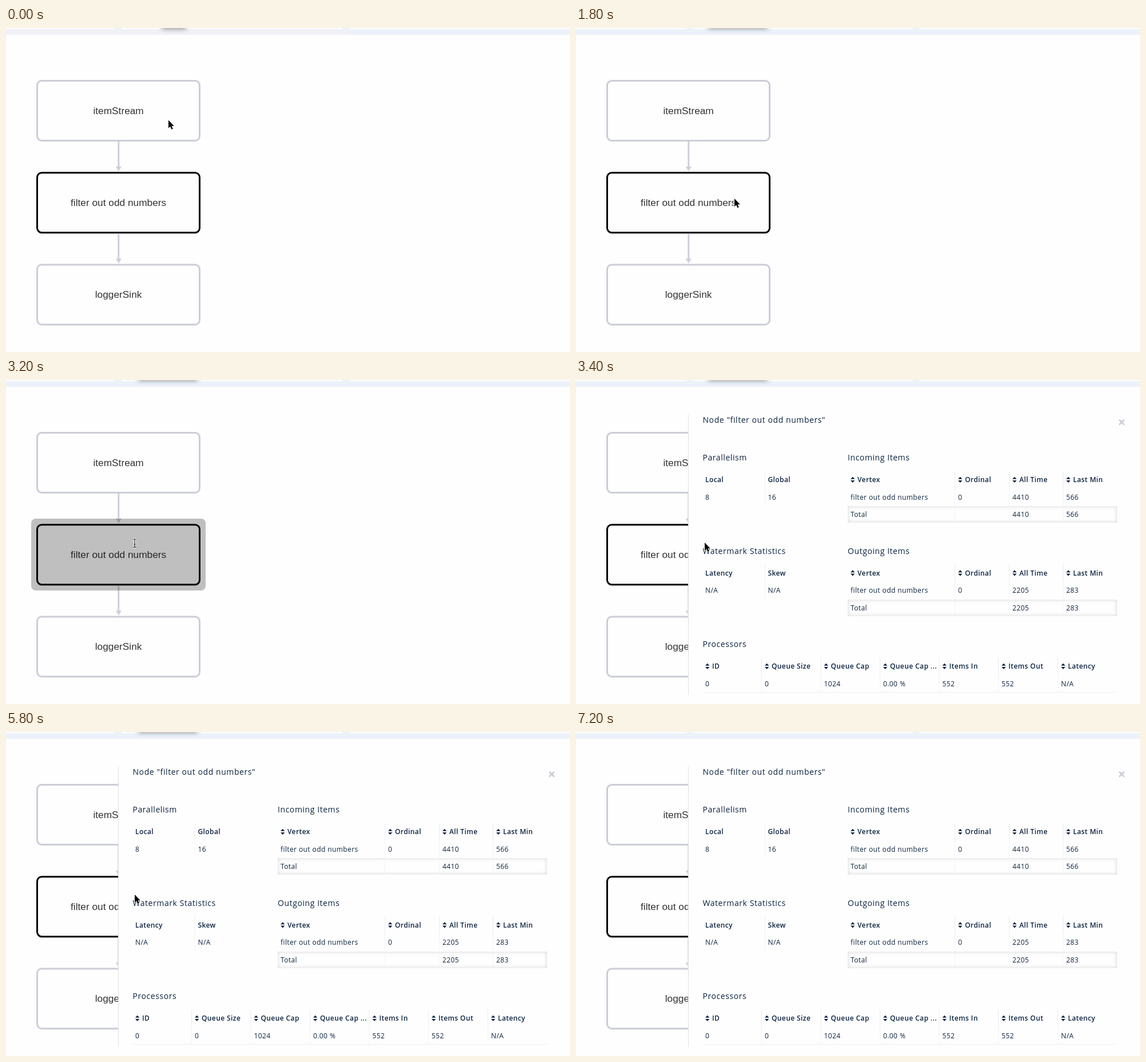
Recreate the animation shown at these times as an HTML page. Size 986 px wide and 568 px high, loop 7.4 s.

```html
<!DOCTYPE html>
<html lang="en">
<head>
<meta charset="utf-8">
<title>Pipeline node details</title>
<style>
  html, body { margin: 0; width: 100%; height: 100%; overflow: hidden; background: #fefefe; }
  #stage { position: relative; width: 986px; height: 568px; overflow: hidden; }
  svg { position: absolute; left: 0; top: 0; }
  #panel { position: absolute; left: 0; top: 0; }
  .backdrop { position: absolute; left: 196px; top: 61px; width: 790px; height: 491px; box-sizing: border-box;
    background: #fefefe; border-left: 1px solid #dfe1e6; }
  .total { position: absolute; left: 475px; width: 471px; height: 29px; box-shadow: inset 0 0 7px rgba(0, 0, 0, .17); }
  .tip { position: absolute; top: -22px; height: 20px; }
  #tipA { left: 275px; width: 38px; box-shadow: 0 1px 9px 2px rgba(0, 0, 0, .5); }
  #tipB { left: 233px; width: 100px; box-shadow: 0 1px 9px 2px rgba(0, 0, 0, .42); }
  .node { font: 17.3px "Liberation Sans", Arial, sans-serif; text-anchor: middle; fill: #333; }
  .title, .cell, .head { font-family: "Open Sans", sans-serif; fill: #0c2340; }
  .title { font-size: 14px; letter-spacing: .57px; }
  .cell { font-size: 12px; letter-spacing: .4px; }
  .head { font-size: 12px; letter-spacing: .4px; font-weight: 600; }
</style>
</head>
<body>
<div id="stage">
  <svg id="graph" width="986" height="568"></svg>
  <div class="tip" id="tipA"></div>
  <div class="tip" id="tipB"></div>
  <div id="panel">
    <div class="backdrop"></div>
    <div class="total" style="top:221px"></div>
    <div class="total" style="top:384.5px"></div>
    <svg id="details" width="986" height="568"></svg>
  </div>
  <svg width="986" height="568">
    <g id="arrow" stroke-linejoin="round">
      <path d="M0 0V14L3.2 11.2 5.4 16.3 7.7 15.3 5.6 10.3H9.8Z" stroke="#fff" stroke-width="1.6" paint-order="stroke"/>
    </g>
    <g id="beam" transform="translate(225 286)" fill="none">
      <path id="beamLine" d="M-3-7.5Q0-7.5 0-5.5Q0-7.5 3-7.5M0-6V6M-3 7.5Q0 7.5 0 5.5Q0 7.5 3 7.5M-1.5 2H1.5" stroke="#fff" stroke-width="3"/>
      <use href="#beamLine" style="stroke:#222"/>
      <path d="M-3-7.5Q0-7.5 0-5.5Q0-7.5 3-7.5M0-6V6M-3 7.5Q0 7.5 0 5.5Q0 7.5 3 7.5M-1.5 2H1.5" stroke="#222" stroke-width="1.2"/>
    </g>
  </svg>
</div>
<script>
const $ = id => document.getElementById(id);
const text = (kind, x, y, s) => `<text class="${kind}" x="${x}" y="${y}">${s}</text>`;
const rect = (x, y, w, h, fill, extra = '') =>
  `<rect x="${x}" y="${y}" width="${w}" height="${h}" fill="${fill}" ${extra}/>`;

function buildGraph() {
  let out = rect(0, 0, 986, 12, '#ecf2fa') + rect(0, 2, 600, 10, '#f1f1f8', 'id="strip"');
  for (const [x, w] of [[0, 190], [203, 385], [600, 386]]) out += rect(x, 0, w, 2, '#fefefe');
  ['itemStream', 'filter out odd numbers', 'loggerSink'].forEach((label, i) => {
    const y = 92.5 + 161.2 * i;
    out += rect(54.5, y, 284, 105, '#fefefe', `rx="8" stroke="${i === 1 ? '#000' : '#cbced8'}" stroke-width="3"`);
    out += text('node', 196.6, y + 58, label);
    if (i < 2) out += `<path d="M195.3 ${y + 106.5}h3v44h3.6l-5 8.5l-5-8.5h3.4z" fill="#cdd0d9"/>`;
  });
  return out + rect(44, 243, 305, 126, '#000', 'id="highlight" rx="8" fill-opacity=".25"');
}

// Column positions are the left edges of the cell text.
function table(title, x, top, columns, heads, rows, sortable) {
  let out = text('title', x, top + 141.3, title);
  const height = sortable && rows.length > 1 ? 90 : 60;
  columns.forEach((cx, i) => {
    if (i) {
      out += rect(cx - 6, top + 160, 1, 30, '#e9ebef');
      out += rect(cx - 6, top + 190, 1, height - 30, '#f3f4f6');
    }
    if (sortable) {
      const y = top + 174.7;
      out += `<path d="M${cx} ${y - 1}l3.7-4 3.7 4zM${cx} ${y + 1.3}l3.7 4 3.7-4z" fill="#0c2340"/>`;
    }
    out += text('head', cx + (sortable ? 12 : 0), top + 179, heads[i]);
    rows.forEach((row, r) => out += text('cell', cx, top + 209.7 + 30.5 * r, row[i]));
  });
  return out;
}

function buildDetails() {
  const name = 'filter out odd numbers';
  const flow = (title, top, all, last) => table(title, 475, top, [480, 668, 763, 857],
    ['Vertex', 'Ordinal', 'All Time', 'Last Min'], [[name, 0, all, last], ['Total', '', all, last]], true);
  return text('title', 221.5, 74.7, `Node "${name}"`)
    + '<path d="M949.5 69.5l9 9m0-9l-9 9" stroke="#c8ccd3" stroke-width="2.5"/>'
    + table('Parallelism', 221.5, 0, [226, 335.5], ['Local', 'Global'], [[8, 16]])
    + table('Watermark Statistics', 221.5, 163.5, [226, 335.5], ['Latency', 'Skew'], [['N/A', 'N/A']])
    + flow('Incoming Items', 0, 4410, 566)
    + flow('Outgoing Items', 163.5, 2205, 283)
    + table('Processors', 221.5, 327, [226, 330, 433.5, 537, 640.5, 744, 848],
        ['ID', 'Queue Size', 'Queue Cap', 'Queue Cap ...', 'Items In', 'Items Out', 'Latency'],
        [[0, 0, 1024, '0.00 %', 552, 552, 'N/A']], true)
    + rect(222, 547, 724, 1, '#eceef1');
}

const LOOP = 7400, STEP = 200;
const ramp = (t, a, b) => Math.min(1, Math.max(0, (t - a) / (b - a)));
const ease = p => p * p * (3 - 2 * p);
// [start, end, x, y] of each pointer move
const moves = [[0, 1000, 277, 299], [2600, 3000, 225, 285], [6200, 7000, 262, -25]];

function pointer(t) {
  let x = 284, y = 161.5;
  for (const [a, b, tx, ty] of moves) {
    const p = ease(ramp(t, a, b));
    x += (tx - x) * p;
    y += (ty - y) * p;
  }
  return `translate(${x} ${y})`;
}

const show = (id, on) => $(id).style.display = on ? '' : 'none';

function draw(now) {
  const t = Math.floor(now % LOOP / STEP) * STEP;
  const pressed = t === 3200;
  $('arrow').setAttribute('transform', pointer(t));
  show('arrow', !pressed);
  show('beam', pressed);
  show('highlight', pressed);
  show('panel', t >= 3400);
  show('strip', t < 600);
  $('tipA').style.opacity = 1 - ramp(t, 1200, 1800);
  $('tipB').style.opacity = ramp(t, 600, 1000) * (1 - ramp(t, 6200, 7000));
}

$('graph').innerHTML = buildGraph();
$('details').innerHTML = buildDetails();
const start = performance.now();
function tick() {
  draw(performance.now() - start);
  requestAnimationFrame(tick);
}
tick();
</script>
</body>
</html>
```
